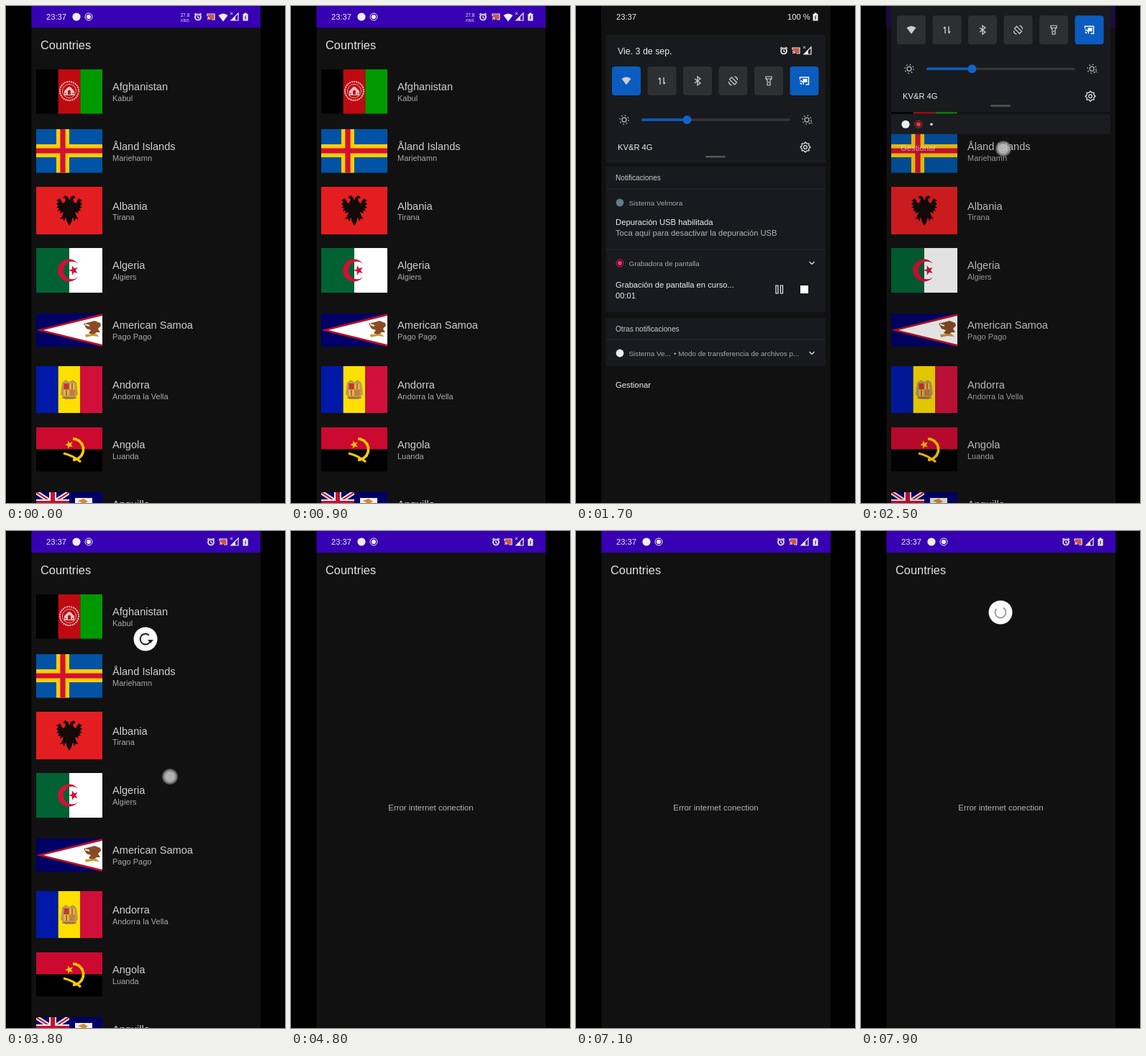
Write an HTML page that moves like this. It is 388 px wide and 690 px high and loops after 8000 ms.

```html
<!DOCTYPE html>
<html lang="en">
<head>
<meta charset="utf-8">
<title>Countries</title>
<style>
  html, body { margin: 0; width: 100%; height: 100%; overflow: hidden; background: #000; }
  svg { display: block; width: 388px; height: 690px; }
  text { font-family: "Liberation Sans", Arial, sans-serif; }
</style>
</head>
<body>
<svg id="stage" viewBox="0 0 388 690"></svg>
<script>
const LOOP = 8000, WIFI_OFF = 1950, DATA_ON = 6500;
const WHITE = '#eee', GREY = '#a9a9a9', CARD = '#181a1d', BLUE = '#0b5cc0';

// Markup helpers
const rect = (x, y, w, h, fill, more = '') => `<rect x="${x}" y="${y}" width="${w}" height="${h}" fill="${fill}" ${more}/>`;
const circ = (x, y, r, fill, more = '') => `<circle cx="${x}" cy="${y}" r="${r}" fill="${fill}" ${more}/>`;
const path = (d, fill, more = '') => `<path d="${d}" fill="${fill}" ${more}/>`;
const line = (d, color, w = 1, more = '') => path(d, 'none', `stroke="${color}" stroke-width="${w}" ${more}`);
const text = (x, y, size, s, fill = WHITE, more = '') => `<text x="${x}" y="${y}" font-size="${size}" fill="${fill}" ${more}>${s}</text>`;
const group = (id, body, more = '') => `<g id="${id}" ${more}>${body}</g>`;
const at = (x, y, body, s = 1) => `<g transform="translate(${x} ${y}) scale(${s})">${body}</g>`;
const mirror = body => body + `<g transform="scale(-1 1)">${body}</g>`;
const stripes = (y, h, ...colors) => colors.map((c, i) => rect(42 + i * 30.67, y, 30.67, h, c)).join('');
const star = (n, R, r) => 'M' + Array.from({ length: n * 2 }, (_, i) => {
  const a = Math.PI * (i / n - 1), q = i % 2 ? r : R;
  return (q * Math.cos(a)).toFixed(1) + ' ' + (q * Math.sin(a)).toFixed(1);
}).join('L') + 'Z';

// Icons, each centred on 0 0
const wifi = c => path('M-6.5 -3Q0 -8 6.5 -3L0 5.5Z', c);
const recorder = (c, dot = c) => circ(0, 0, 5, 'none', `stroke="${c}"`) + circ(0, 0, 3.1, dot);
const alarm = circ(0, .5, 4, 'none', `stroke="${WHITE}" stroke-width="1.7"`) +
  line('M0 -2V1L2 2M-5 -3L-2.5 -5M5 -3L2.5 -5', WHITE, 1.3);
const cast = rect(-4.5, -3.5, 9, 7, '#d4553f') + line('M-5 -1V-4H5V4H1M-5 1Q-2 1 -2 4M-5 3.5H-4', WHITE, 1.2);
const signal = path('M-5 5L5 -5V5Z', 'none', `stroke="${WHITE}" stroke-width="1.2"`) + path('M-5 5L1 -1V5Z', WHITE);
const cross = line('M-6 -6L-3 -3M-3 -6L-6 -3', WHITE, 1);
const battery = path('M-3.5 -4H-1.5V-5.5H1.5V-4H3.5V5.5H-3.5Z', WHITE) + line('M1 -2L-1 1H1L-1 4', '#333', 1);
const sun = circ(0, 0, 3, 'none', `stroke="${GREY}" stroke-width="1.4"`) +
  circ(0, 0, 6, 'none', `stroke="${GREY}" stroke-width="1.6" stroke-dasharray="1.6 3.11"`);
const gear = path(star(8, 7, 5.2), 'none', `stroke="${WHITE}" stroke-width="1.2"`) +
  circ(0, 0, 2.3, 'none', `stroke="${WHITE}" stroke-width="1.2"`);
const chevron = line('M-3.5 -2L0 1.5L3.5 -2', WHITE, 1.2);

// Flags
const eagle = mirror(path('M0 -13L2 -18L6 -20L9 -17L5 -15L6 -11L9 -9L13 -16L18 -13L15 -11L18 -8L15 -6L18 -3L14 -2L16 2L12 1L13 5L8 3L10 9L13 13L9 12L7 16L5 10L3 17L0 22Z', '#120909'));
const jack = line('M0 0L46 30M46 0L0 30', '#eee', 6) + line('M0 0L46 30M46 0L0 30', '#c8102e', 2) +
  line('M23 0V30M0 15H46', '#eee', 10) + line('M23 0V30M0 15H46', '#c8102e', 6);
const flags = [
  stripes(88, 61.5, '#000', '#bf0a12', '#009a00') + at(88, 118,
    circ(0, 0, 13, 'none', 'stroke="#e8c4c4" stroke-width="2" stroke-dasharray="2 1"') +
    circ(0, 0, 9.5, 'none', 'stroke="#e8c4c4" stroke-width=".8"') +
    path('M-7 6V0L-4 -3Q0 -9 4 -3L7 0V6Z', '#e8c4c4') + path('M-2 5V0Q0 -3 2 0V5ZM-6 3H-4V4H-6ZM4 3H6V4H4Z', '#bf0a12')),
  rect(42, 171, 92, 60.5, '#0053a5') + line('M79 171V231.5M42 201H134', '#ffce00', 18) + line('M79 171V231.5M42 201H134', '#d21034', 7.2),
  rect(42, 251, 92, 66, '#e41e20') + at(88, 283, eagle),
  rect(42, 336, 46, 62, '#006233') + rect(88, 336, 46, 62, '#fff') +
    path('M100 357.5A15.5 15.5 0 1 0 100 376.5A12.3 12.3 0 1 1 100 357.5Z', '#d21034') + at(94, 367, path(star(5, 7, 2.8), '#d21034')),
  rect(42, 427, 92, 46, '#000066') + path('M42 450L134 427V473Z', '#bd1021') + path('M52 450L134 430V470Z', '#fff') +
    at(119, 450, path('M-11 -9L-3 -11L4 -13L12 -10L13 -6L9 -2L12 3L7 3L2 7L-4 4L-1 0L-7 -2Z', '#8a4b24') +
      path('M-9 6L6 5L11 9L1 8L-8 10Z', '#c69a3c') + line('M-9 -8L-3 -6', '#eee', 2)),
  stripes(500, 65, '#0018a8', '#fedf00', '#d0103a') + at(88, 532,
    path('M-10 -9L-5 -13L0 -10L5 -13L10 -9L12 7L6 14H-6L-12 7Z', '#b99a55') + rect(-7.5, -8, 7, 8, '#c9342f') +
    rect(.5, -8, 7, 8, '#e8b93c') + rect(-7.5, 1, 7, 8, '#e8b93c') + rect(.5, 1, 7, 8, '#c77a3c') +
    line('M-4 1V9M4 -8V0M-10 12H10', '#8e3a2a', 1.2)),
  rect(42, 585, 92, 30.7, '#cc092f') + rect(42, 615.5, 92, 30.7, '#000') + at(91, 615,
    line('M2 -14A14 14 0 0 1 2 15', '#ffcb00', 3.6) + circ(2, .5, 15.5, 'none', 'stroke="#ffcb00" stroke-width="2" stroke-dasharray="2 4 2 4 2 4 2 4 2 4 2 4 2 4 2 60" transform="rotate(-80 2 .5)"') +
    line('M-11 6Q2 9 13 18', '#ffcb00', 3.2) + at(-3, -6, path(star(5, 6, 2.4), '#ffcb00'))),
  rect(42, 675, 92, 20, '#000066') + `<svg x="42" y="675" width="46" height="30">${jack}</svg>` +
    path('M96 683H120V700H96Z', '#eee') + path('M100 687L108 684L114 688L108 691Z', '#d98a2b')
].join('');

const countries = [['Afghanistan', 'Kabul'], ['Åland Islands', 'Mariehamn'], ['Albania', 'Tirana'], ['Algeria', 'Algiers'],
  ['American Samoa', 'Pago Pago'], ['Andorra', 'Andorra la Vella'], ['Angola', 'Luanda'], ['Anguilla', 'The Valley']];
const names = countries.map(([name, capital], i) =>
  text(148, 117 + i * 82.83, 14.6, name, '#cfcfcf') + text(148, 131.7 + i * 82.83, 11, capital, GREY)).join('');

const statusBar = rect(35.5, 0, 318.5, 30, '#3700b3') + text(56, 19, 11.2, '23:37') + circ(98, 15, 5.6, WHITE) + at(115, 15, recorder(WHITE)) +
  group('online', text(249, 15, 6.4, '27.8', WHITE, 'text-anchor="middle"') + text(249, 22, 5, 'KB/S', WHITE, 'text-anchor="middle"') +
    at(267, 15, alarm) + at(285, 15, cast) + at(302, 16, wifi(WHITE))) +
  group('offline', at(285, 15, alarm) + at(302, 15, cast)) +
  at(318, 15, signal + group('barCross', cross)) + at(333, 15, battery);

// Quick settings panel
const tileIcons = [
  wifi('#ccc'),
  line('M-2.5 5V-4M-4.5 -2L-2.5 -4.5M2.5 -5V4M4.5 2L2.5 4.5', '#ccc', 1.4),
  line('M-4 -3L4 3L0 6V-6L4 -3L-4 3', '#ccc', 1.3),
  line('M-2 -5L5 2L2 5L-5 -2ZM2 -6Q6 -5 6 -1M-2 6Q-6 5 -6 1', '#ccc', 1.3),
  line('M-4 -6H4V-3L2 -1V6H-2V-1L-4 -3ZM-4 -3H4M0 1V3', '#ccc', 1.2),
  line('M-6 -2V-5H6V5H2M-6 0Q-1 0 -1 5M-6 3Q-4 3 -4 5', '#fff', 1.4) + rect(-2, -3, 6, 5, '#fff')
];
const tiles = tileIcons.map((icon, i) =>
  rect(50 + i * 49.5, 84, 40, 40, i === 5 ? BLUE : '#2d2f31', `rx="4" id="tile${i}"`) + at(70 + i * 49.5, 104, icon)).join('');
const panel = text(56, 19, 11.2, '23:37') + text(294, 19, 11.2, '100 %') + at(333, 15, battery) +
  rect(42, 40, 305, 178, CARD) + text(58, 66.5, 12.4, 'Vie. 3 de sep.') +
  at(289, 62, alarm) + at(306, 62, cast) + at(322, 62, signal + group('panelCross', cross)) + tiles +
  rect(91, 156.2, 207, 3.6, '#333639', 'rx="1.8"') + rect(91, 156.2, 64, 3.6, BLUE, 'rx="1.8"') + circ(154.5, 158, 6, '#1262c9') +
  at(67, 158, sun) + at(321, 158, sun) + text(325, 164, 6, 'A', GREY) +
  text(58, 200, 11.2, 'KV&amp;R 4G') + at(319, 196, gear) + rect(180, 208, 28, 2.4, '#555', 'rx="1.2"');

const rule = y => rect(42, y, 305, 1, '#26292c');
const cards = rect(42, 223, 305, 202, CARD) + rect(42, 433, 305, 67, CARD) + rule(253.5) + rule(337.5) + rule(462.5) +
  text(55, 242, 10.1, 'Notificaciones', '#ccc') + circ(61, 273, 5.4, '#607d8b') + text(73.5, 276.5, 9.9, 'Sistema Velmora', GREY) +
  text(55, 304, 11.3, 'Depuración USB habilitada') + text(55, 318.5, 11.2, 'Toca aquí para desactivar la depuración USB', '#b5b5b5') +
  at(61, 357, recorder('#d81b60', '#ff2d6f')) + text(73.5, 360.5, 9.9, 'Grabadora de pantalla', GREY) + at(328, 357, chevron) +
  text(55, 391, 11.2, 'Grabación de pantalla en curso...') + text(55, 405.5, 11.2, '00:00', WHITE, 'id="clock"') +
  line('M278 388H281V399H278ZM284.5 388H287.5V399H284.5Z', WHITE, 1.2) + rect(312, 388, 11, 11, '#fff') +
  text(55, 451.5, 10.1, 'Otras notificaciones', '#ccc') + circ(61, 482, 5.4, WHITE) + text(73.5, 485.5, 9.9, 'Sistema Ve...', GREY) +
  text(136, 485.5, 9.9, '• Modo de transferencia de archivos p...', GREY) + at(328, 482, chevron);
const shelf = rect(42, 221, 305, 27.5, '#1b1c20') + circ(62, 235, 5.6, WHITE) + at(80, 235, recorder('#c62828', '#e53935')) + circ(98, 235, 1.8, WHITE);

document.getElementById('stage').innerHTML =
  `<defs>
    <clipPath id="cardClip"><rect id="cardBox" x="36" y="220" width="318" height="285"/></clipPath>
    <clipPath id="body"><rect x="35" y="78" width="319" height="612"/></clipPath>
    <radialGradient id="glow"><stop offset=".5" stop-color="#c4c4c4"/><stop offset=".78" stop-color="#999" stop-opacity=".8"/><stop offset="1" stop-color="#777" stop-opacity="0"/></radialGradient>
  </defs>` +
  rect(35.5, 0, 318.5, 690, '#111') + statusBar + text(48, 60, 16.4, 'Countries', '#e2e2e2') +
  group('list', flags + names) +
  group('error', text(194.5, 388, 11.4, 'Error internet conection', '#b5b5b5', 'text-anchor="middle"')) +
  `<g clip-path="url(#body)">` + group('spinner', circ(0, 0, 16.5, '#fafafa') +
    group('arrow', line('M5 -5.2A7.3 7.3 0 1 0 7.2 1', '#222', 2) + path('M3 1H11L7 6Z', '#222')) +
    group('ring', circ(0, 0, 7.5, 'none', 'stroke="#999" stroke-width="1.8" pathLength="100" stroke-dasharray="78 22"'))) + '</g>' +
  rect(35.5, 0, 318.5, 30, '#111', 'id="barDim"') + rect(35.5, 0, 318.5, 690, '#111', 'id="scrim"') +
  group('shade', `<g clip-path="url(#cardClip)">${group('cards', cards)}</g>` + group('shelf', shelf) +
    text(55, 530, 11.3, 'Gestionar', WHITE, 'id="manage"') + panel) +
  circ(0, 0, 12, 'url(#glow)', 'id="finger" opacity=".9"');

const el = {};
document.querySelectorAll('[id]').forEach(e => el[e.id] = e);
const set = (id, name, v) => el[id].setAttribute(name, v);
const show = (id, on) => el[id].style.display = on ? '' : 'none';
const clamp = v => Math.max(0, Math.min(1, v));

// Linear track of [time, value] pairs
function track(t, keys) {
  for (let i = 1; i < keys.length; i++) {
    const [t0, a] = keys[i - 1], [t1, b] = keys[i];
    if (t < t1) return a + (b - a) * clamp((t - t0) / (t1 - t0));
  }
  return keys[keys.length - 1][1];
}

const shadeKeys = [[1250, 0], [1450, .68], [1650, 1], [2350, 1], [2500, .68], [2720, 0],
  [5350, 0], [5600, .68], [5800, 1], [6700, 1], [6850, .68], [7080, 0]];
const pullKeys = [[3500, 55], [3800, 150], [3930, 152], [4130, 113], [7450, 113], [7451, 55], [7680, 150], [7740, 150], [7880, 113]];
// Touches: start time, x, y, end time, x, y, lift time
const touches = [
  [1220, 200, 20, 1550, 204, 300, 1600], [1850, 70, 104, 1980, 70, 104, 1980],
  [2280, 198, 394, 2500, 198, 199, 2640],
  [3500, 224, 160, 3800, 228, 341, 3930],
  [5320, 200, 20, 5680, 204, 310, 5740], [6400, 119, 104, 6530, 119, 104, 6530],
  [6620, 200, 400, 6940, 200, 110, 6950], [7460, 218, 150, 7700, 222, 320, 7740]
];

function draw(t) {
  const p = track(t, shadeKeys), e = clamp((p - .68) / .32);
  const failed = t >= 4500, wifiOn = t < WIFI_OFF, dataOn = t >= DATA_ON;
  show('list', !failed);
  show('error', failed);
  show('online', wifiOn);
  show('offline', !wifiOn);
  show('barCross', !dataOn);
  show('panelCross', !dataOn);

  show('shade', p > 0);
  set('shade', 'transform', `translate(0 ${(p - 1) * 219})`);
  set('scrim', 'opacity', p < .68 ? p * .18 : .12 + .88 * e);
  set('barDim', 'opacity', clamp(p));
  set('cardBox', 'height', 30 + 255 * e);
  set('cards', 'opacity', e);
  set('shelf', 'opacity', (1 - e) * clamp(p * 3));
  set('manage', 'y', 272 + 258 * e);
  set('manage', 'opacity', clamp(p * 1.5 - .4));
  set('tile0', 'fill', wifiOn ? BLUE : '#2d2f31');
  set('tile1', 'fill', dataOn ? BLUE : '#2d2f31');
  el.clock.textContent = '00:0' + Math.floor(t / 1000);

  const loading = t >= 4000 && t < 7000 || t >= 7780;
  const scale = t < 7000 ? clamp((4650 - t) / 150) : 1;
  show('spinner', t >= 3500 && t < 4650 || t >= 7460);
  set('spinner', 'transform', `translate(194 ${track(t, pullKeys)}) scale(${scale})`);
  show('arrow', !loading);
  show('ring', loading);
  set('arrow', 'transform', `rotate(${track(t, [[3500, -200], [3800, 0], [7450, 0], [7451, -200], [7700, 0]])})`);
  set('ring', 'transform', `rotate(${(t - 7900) * .4 - 60})`);

  const touch = touches.find(k => t >= k[0] && t < k[6]);
  show('finger', touch);
  if (touch) {
    const [t0, x0, y0, t1, x1, y1, lift] = touch;
    // The closing swipe keeps its speed until it lifts
    const k = t0 === 2280 ? (t - t0) / (t1 - t0) : Math.min(1, (t - t0) / (t1 - t0));
    set('finger', 'transform', `translate(${x0 + (x1 - x0) * k} ${y0 + (y1 - y0) * k})`);
  }
}

const start = performance.now();
(function tick() {
  draw((performance.now() - start) % LOOP);
  requestAnimationFrame(tick);
})();
</script>
</body>
</html>
```
